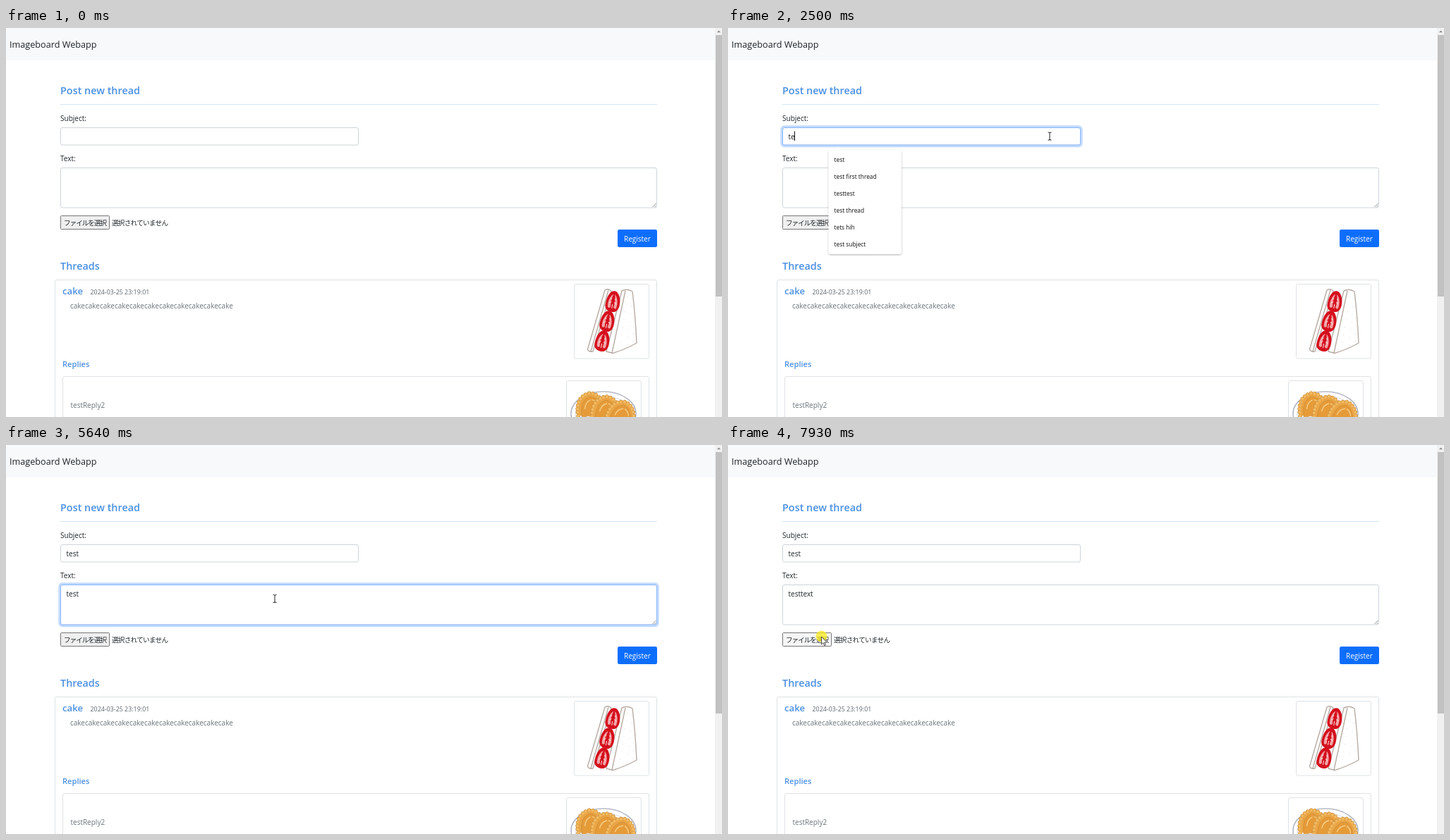
An HTML page that plays this animation: 1015 by 552 pixels, repeating every 8 s.

```html
<!DOCTYPE html>
<html lang="ja">
<head>
<meta charset="utf-8">
<title>Imageboard Webapp</title>
<style>
html, body { margin: 0; width: 100%; height: 100%; overflow: hidden; background: #fff; }
svg { display: block; width: 100%; height: 100%; }
text { font: 10px "Open Sans", "Noto Sans CJK JP", sans-serif; fill: #212529; white-space: pre; }
.head { font-size: 14.4px; font-weight: 600; fill: #4a90e2; }
.muted { fill: #6c757d; }
.file { font: 9.6px "Noto Sans CJK JP", sans-serif; }
.box { fill: #fff; stroke: #ced4da; }
.card { fill: #fff; stroke: #dee2e6; }
.ring rect { fill: none; }
.glow { stroke: #0d6efd; stroke-opacity: .25; stroke-width: 2.7; }
.edge { stroke: #86b7fe; }
.item { font-size: 8.4px; fill: #111; }
.bread { fill: #fff; stroke: #b8aca4; stroke-width: 1.4; stroke-linejoin: round; }
.crumbs { fill: none; stroke: #e3ddd7; stroke-width: 1.3; stroke-linecap: round; stroke-dasharray: 0 11; }
</style>
</head>
<body>
<svg viewBox="0 0 1015 552">
  <defs>
    <g id="berry">
      <path fill="#d5101d" d="M0-15C6-15 11-5 10 5 9 13 5 15 0 15-6 15-11 11-10 4-10-6-6-15 0-15z"/>
      <path fill="#f2a3a5" d="M-1-10C-5-8-8 2-6 9Q-4 11-2 8Q-4 0-1-10zM1-10C5-8 8 2 6 9Q4 11 2 8Q4 0 1-10z"/>
      <path stroke="#fbe3e3" stroke-width="1" d="M-5 3l3-2M5 3l-3-2M-4-3l2-1M4-3l-2-1M0 4v6"/>
    </g>
    <g id="dumpling" stroke-linecap="round">
      <path id="fold" fill="#eaa545" stroke="#cf8f3a" stroke-width="5.6" stroke-dasharray="0 5" d="M-20 13Q-21-14 0-17 17-15 20 12"/>
      <path fill="#eaa545" stroke="#f0b961" stroke-width="4.2" stroke-dasharray="0 5" d="M-20 13Q-21-14 0-17 17-15 20 12"/>
      <path fill="#e69b39" stroke="#cf8f3a" stroke-width=".8" d="M-15 15Q-15-9 0-12 13-10 16 14z"/>
      <path fill="none" stroke="#f6cd86" stroke-width="1.4" d="M-9 4Q-7-5 0-7M3-7Q8-5 10 1"/>
    </g>
    <filter id="shadow" x="-10%" y="-10%" width="120%" height="120%">
      <feDropShadow dx="0" dy="1" stdDeviation="1.3" flood-opacity=".32"/>
    </filter>
  </defs>

  <rect width="1005" height="46" fill="#f7f9fb"/>
  <text x="5" y="28" style="font-size:12.65px">Imageboard Webapp</text>
  <rect x="1005" width="10" height="552" fill="#f1f1f1"/>
  <rect x="1006" y="10" width="9" height="371" fill="#c1c1c1"/>
  <path d="M1008 6.3h5l-2.5-2.8z" fill="#8b8b8b"/>

  <text class="head" x="77" y="94">Post new thread</text>
  <path d="M77 108.5H923" stroke="#d2e4f6"/>
  <text x="77" y="131.5">Subject:</text>
  <rect class="box" x="77.5" y="141.5" width="422" height="24.5" rx="2.5"/>
  <text x="77" y="188.5">Text:</text>
  <rect class="box" x="77.5" y="198.5" width="845" height="56.5" rx="2.5"/>
  <path d="M916.5 254l5-5M919.5 254l2-2" stroke="#777" stroke-width=".8"/>
  <g class="ring" id="ring0">
    <rect class="glow" x="75.7" y="139.7" width="425.6" height="28.1" rx="4"/>
    <rect class="edge" x="77.5" y="141.5" width="422" height="24.5" rx="2.5"/>
  </g>
  <g class="ring" id="ring1">
    <rect class="glow" x="75.7" y="196.7" width="848.6" height="60.1" rx="4"/>
    <rect class="edge" x="77.5" y="198.5" width="845" height="56.5" rx="2.5"/>
  </g>
  <text id="subject" x="85.5" y="157.5"></text>
  <text id="body" x="85.5" y="214.5"></text>
  <rect id="caret" width="1" height="13.5" fill="#111"/>

  <rect id="button" x="77.5" y="266.5" width="69" height="19" rx="1" stroke="#767676"/>
  <text class="file" x="82" y="279.7" letter-spacing="-1">ファイルを選択</text>
  <text class="file" x="150" y="279.7" letter-spacing="-.72">選択されていません</text>
  <rect x="867" y="286" width="56" height="25" rx="2.5" fill="#0d6efd"/>
  <text x="876" y="302.5" style="fill:#fff">Register</text>

  <text class="head" x="77" y="343">Threads</text>
  <rect class="card" x="69.5" y="357.5" width="853" height="220" rx="2.5"/>
  <text class="head" x="80" y="378" style="font-size:13.2px">cake</text>
  <text x="119.5" y="378" style="font-size:8.9px;font-weight:500;fill:#5d656d">2024-03-25 23:19:01</text>
  <text class="muted" x="91" y="397.5">cakecakecakecakecakecakecakecakecakecakecake</text>
  <rect class="card" x="805.5" y="363.5" width="106" height="105.5" rx="2.5"/>
  <text class="head" x="80" y="480.5" style="font-size:11.1px">Replies</text>
  <rect class="card" x="80.5" y="494.5" width="831" height="90" rx="2.5"/>
  <text class="muted" x="91.5" y="538.5">testReply2</text>
  <rect class="card" x="794.5" y="500.5" width="106" height="106" rx="2.5"/>

  <path class="bread" d="M849 372L824.5 456Q826 460 832 459L858 373Q854 369 849 372zM854 372L829 459"/>
  <path class="bread" d="M873 373Q881 369 888 374Q892 405 894 447Q878 456 860 461.500L851 459zM878 373L859 461"/>
  <path class="crumbs" d="M881 381L870 452M887 384L881 450M890 412L889 446"/>
  <use href="#berry" transform="translate(860.500 388) rotate(10)"/>
  <use href="#berry" transform="translate(852.500 416) rotate(12)"/>
  <use href="#berry" transform="translate(845.500 444) rotate(12)"/>

  <g fill="#fff" stroke="#b6bac6">
    <ellipse cx="847" cy="547" rx="46" ry="31" stroke-width="1.6"/>
    <ellipse cx="847" cy="549" rx="40" ry="27" stroke="#d9dce3"/>
  </g>
  <use href="#dumpling" transform="translate(829 535) rotate(-8)"/>
  <use href="#dumpling" transform="translate(851 540) rotate(4)"/>
  <use href="#dumpling" transform="translate(873 547) rotate(14)"/>

  <g id="menu">
    <g filter="url(#shadow)">
      <rect id="panel" x="142.500" y="172.500" width="103.500" rx="4" fill="#fff"/>
    </g>
    <path d="M152 173l4-4.500 4 4.500z" fill="#fff"/>
    <g id="items"></g>
  </g>

  <circle id="spot" r="8" fill="#f7ea1c" fill-opacity=".75"/>
  <path id="beam" fill="none" stroke="#333" stroke-width="1.1" d="M-2.500-5.500Q0-5.500 0-4.500 0-5.500 2.500-5.500M0-4.500V4.500M-2.500 5.500Q0 5.500 0 4.500 0 5.500 2.500 5.500"/>
  <path id="arrow" fill="#fff" stroke="#222" stroke-width=".8" stroke-linejoin="round" d="M0 0V11L2.500 8.700 4.200 12.600 5.900 11.900 4.200 8.100H7.800z"/>
</svg>
<script>
const $ = id => document.getElementById(id);
const LOOP = 8000;

// Tracks are [time, value...] steps, each held until the next.
const cursor = [
  [0, -50, -50], [250, 637, 421], [320, 524, 290], [390, 545, 262],
  [590, 532, 240], [660, 497, 198], [730, 462, 163], [800, 447, 146], [870, 456, 142],
  [1070, 456, 144], [1140, 456, 148], [1210, 456, 151], [1280, 456, 153.5],
  [3500, 449, 161], [3570, 426, 182], [3640, 400, 203], [3710, 385, 214], [3770, 381, 218],
  [7120, 351, 221], [7190, 315, 227], [7260, 272, 236], [7320, 232, 246], [7390, 196, 256],
  [7460, 168, 264], [7530, 147, 269], [7590, 136, 271], [7660, 132.5, 272]
];
const subject = [[0, ""], [2300, "t"], [2500, "te"], [2770, "tes"], [2970, "test"]];
const body = [[0, ""], [4650, "t"], [4710, "te"], [4980, "tes"], [5110, "test"],
  [5780, "testt"], [5910, "testte"], [6260, "testtex"], [6590, "testtext"]];
const caret = [[0, 0], [1480, 1], [2020, 0], [2300, 1], [3500, 0], [4040, 1], [4580, 0],
  [4650, 1], [5640, 0], [5780, 1], [7120, 0], [7660, 1], [7800, 0]];
const ring0 = [[0, 0], [1550, .35], [1620, .8], [1690, 1], [4110, .5], [4180, .15], [4250, 0]];
const ring1 = [[0, 0], [4110, .5], [4180, .85], [4250, 1], [7800, .8], [7870, .3], [7930, 0]];
const spot = [[0, 0], [1480, 1], [1690, 0], [4040, 1], [4250, 0], [7800, 1]];
const menu = [[0, 0], [1550, 1], [4040, .9], [4110, .5], [4180, .2], [4250, 0]];
const lists = [
  [0, "てｓｔ", "test", "hvgh", "dsffs", "first subject", "happy cat"],
  [2300, "test", "testtest", "test first thread", "test thread", "thread", "tets hih"],
  [2500, "test", "test first thread", "testtest", "test thread", "tets hih", "test subject"],
  [2770, "test", "test first thread", "testtest", "test thread", "test subject"]
];

const at = (track, t) => track.findLast(step => step[0] <= t).slice(1);
const fade = (id, value) => $(id).setAttribute("opacity", value);
const place = (id, x, y) => $(id).setAttribute("transform", `translate(${x} ${y})`);

const rows = Array.from({ length: 6 }, (_, i) => {
  const row = document.createElementNS("http://www.w3.org/2000/svg", "text");
  row.setAttribute("class", "item");
  row.setAttribute("x", 150.5);
  row.setAttribute("y", 190 + 24 * i);
  return $("items").appendChild(row);
});

function draw(t) {
  const [x, y] = at(cursor, t);
  const typing = x > 77 && (x < 500 && y > 141 && y < 166 || x < 923 && y > 198 && y < 255);
  const hover = x > 77 && x < 147 && y > 266 && y < 286;
  place("beam", x, y);
  place("arrow", x, y);
  place("spot", typing ? x - 1.5 : x, y - .5);
  fade("beam", typing ? 1 : 0);
  fade("arrow", typing ? 0 : 1);
  fade("spot", at(spot, t));
  fade("ring0", at(ring0, t));
  fade("ring1", at(ring1, t));
  $("button").setAttribute("fill", !hover ? "#efefef" : t < 7800 ? "#e5e5e5" : "#f5f5f5");

  $("subject").textContent = at(subject, t)[0];
  $("body").textContent = at(body, t)[0];
  const field = $(t < 4040 ? "subject" : "body");
  const width = field.textContent ? field.getComputedTextLength() : 0;
  place("caret", Math.max(86, Math.round(85 + width)), t < 4040 ? 146.5 : 203.5);
  fade("caret", at(caret, t));

  const list = at(lists, t);
  rows.forEach((row, i) => row.textContent = list[i] || "");
  $("panel").setAttribute("height", 4.5 + 24 * list.length);
  fade("menu", at(menu, t));
}

const start = performance.now();
function tick() {
  draw((performance.now() - start) % LOOP);
  requestAnimationFrame(tick);
}
tick();
</script>
</body>
</html>
```
